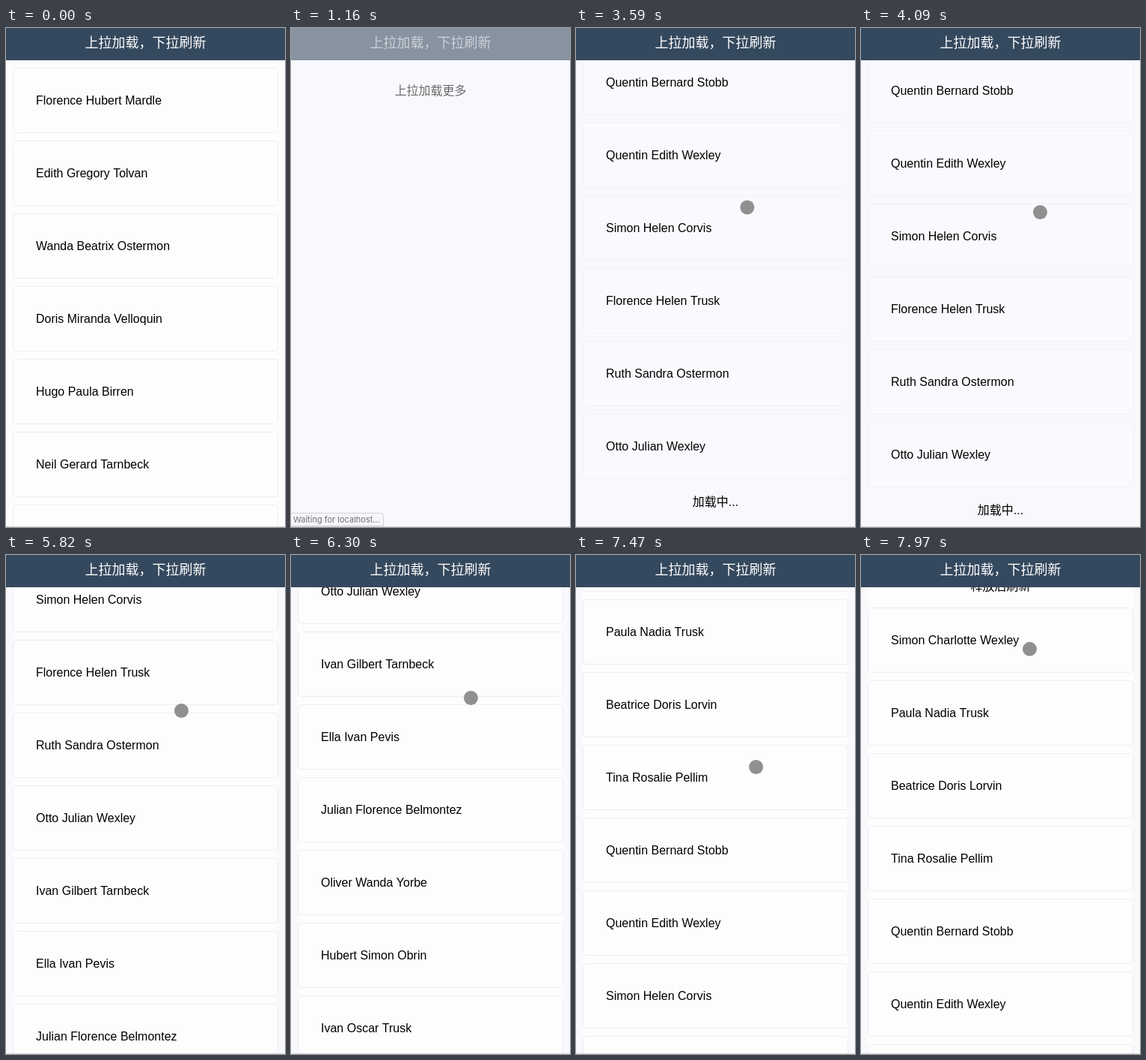
An HTML page with a canvas for the animation above (8 s loop, 373x665 px).

```html
<!DOCTYPE html>
<html lang="zh-CN">
<head>
<meta charset="utf-8">
<title>上拉加载，下拉刷新</title>
<style>
html, body { margin: 0; width: 100%; height: 100%; overflow: hidden; background: #fdfdfd; }
canvas { display: block; width: 373px; height: 665px; }
</style>
</head>
<body>
<canvas id="stage" width="373" height="665"></canvas>
<script>
const ctx = document.getElementById('stage').getContext('2d');
const W = 373, H = 665, LOOP = 8000;
const PITCH = 97, TOP = 53;
const CJK = '"Noto Sans CJK SC", "Noto Sans CJK", sans-serif';
const SANS = '16px "Liberation Sans", ' + CJK;

const CLEAR = 870, FADE = 510, READY = 1690, LOADED = 5110;

const oldRows = [
  'Florence Hubert Mardle', 'Edith Gregory Tolvan', 'Wanda Beatrix Ostermon',
  'Doris Miranda Velloquin', 'Hugo Paula Birren', 'Neil Gerard Tarnbeck',
  'Gustav Helen Mardle'
];
const newRows = [
  'Simon Charlotte Wexley', 'Paula Nadia Trusk', 'Beatrice Doris Lorvin',
  'Tina Rosalie Pellim', 'Quentin Bernard Stobb', 'Quentin Edith Wexley',
  'Simon Helen Corvis', 'Florence Helen Trusk', 'Ruth Sandra Ostermon',
  'Otto Julian Wexley', 'Ivan Gilbert Tarnbeck', 'Ella Ivan Pevis',
  'Julian Florence Belmontez', 'Oliver Wanda Yorbe', 'Hubert Simon Obrin',
  'Ivan Oscar Trusk', 'Neil Clara Trusk', 'Edith Neil Lorvin',
  'Duncan Rosalie Pevis', 'Gustav Helen Mardle'
];

// [time, scroll offset]
const scrollKeys = [
  [3180, 0], [3300, 100], [3420, 290], [3580, 412], [3680, 412], [3960, 401],
  [5300, 401], [5450, 480], [5820, 619], [6060, 690], [6300, 920], [6620, 1130],
  [6880, 1234], [6980, 1240], [7140, 1060], [7340, 420], [7540, 0],
  [7720, -52], [7970, -17], [8000, -14]
];
// [time, x, y]
const touchKeys = [
  [2160, 157, 17], [2340, 172, 100], [2520, 186, 180], [2760, 188, 186],
  [3060, 219, 314], [3180, 224, 380], [3420, 224, 255], [3700, 232, 235],
  [4090, 239, 245], [5110, 239, 245], [5290, 243, 330], [5500, 238, 235],
  [5820, 234, 207], [6060, 243, 320], [6300, 240, 190], [6600, 244, 300],
  [6880, 240, 183], [6980, 241, 170], [7200, 250, 330], [7420, 243, 300],
  [7580, 234, 230], [7970, 225, 125], [8000, 225, 122]
];

const clamp = (v, a, b) => Math.min(b, Math.max(a, v));

// Monotone cubic interpolation of column c
function track(keys, t, c = 1) {
  const last = keys.length - 1;
  if (t <= keys[0][0]) return keys[0][c];
  if (t >= keys[last][0]) return keys[last][c];
  let i = 0;
  while (t >= keys[i + 1][0]) i++;
  const slope = k => k < 0 || k >= last ? 0 :
    (keys[k + 1][c] - keys[k][c]) / (keys[k + 1][0] - keys[k][0]);
  const tangent = k => {
    const a = slope(k - 1), b = slope(k);
    return a * b <= 0 ? 0 : 2 * a * b / (a + b);
  };
  const h = keys[i + 1][0] - keys[i][0], u = (t - keys[i][0]) / h, v = 1 - u;
  return keys[i][c] * (1 + 2 * u) * v * v + keys[i + 1][c] * u * u * (3 - 2 * u) +
    h * u * v * (tangent(i) * v - tangent(i + 1) * u);
}

function rect(color, x, y, w, h) {
  ctx.fillStyle = color;
  ctx.fillRect(x, y, w, h);
}

function text(str, x, y, font, color, align = 'left') {
  ctx.font = font;
  ctx.fillStyle = color;
  ctx.textAlign = align;
  ctx.fillText(str, x, y);
}

const note = (str, mid) => text(str, W / 2, mid + 6, SANS, '#000', 'center');

function drawRows(rows, scroll, fill, border) {
  rows.forEach((name, i) => {
    const y = TOP + i * PITCH - scroll;
    if (y > H || y < -PITCH) return;
    ctx.beginPath();
    ctx.roundRect(9.5, y + .5, 354, 86, 4);
    ctx.fillStyle = fill;
    ctx.fill();
    ctx.strokeStyle = border;
    ctx.lineWidth = 1;
    ctx.stroke();
    text(name, 40, y + 49, SANS, '#000');
  });
}

function drawHeader() {
  rect('#35495e', 0, 0, W, 43);
  text('上拉加载，下拉刷新', W / 2, 26, '500 18px ' + CJK, '#fff', 'center');
}

function drawStatus(alpha) {
  if (alpha <= 0) return;
  ctx.globalAlpha = alpha;
  ctx.beginPath();
  ctx.roundRect(-2.5, 646.5, 126, 17, [0, 4, 0, 0]);
  ctx.fillStyle = '#f6f6f9';
  ctx.fill();
  ctx.strokeStyle = '#d2d2da';
  ctx.stroke();
  text('Waiting for localhost...', 3, 659, '11px Inter, sans-serif', '#70707a');
  ctx.globalAlpha = 1;
}

function drawList(t) {
  const full = t >= LOADED;
  const rows = full ? newRows : newRows.slice(0, 10);
  const scroll = Math.round(track(scrollKeys, t));
  if (full) rect('#fdfdfe', 9, 43, 355, 621);
  if (scroll < 0) note(t < 7690 ? '下拉刷新' : '释放后刷新', 24 - scroll);
  drawRows(rows, scroll, full ? '#fdfdfe' : '#faf9fd', full ? '#ededf0' : '#f2f1f5');
  const loading = !full && t > 3560;
  note(loading ? '加载中...' : '上拉加载更多', TOP + rows.length * PITCH + 20 - scroll);
}

function draw(t) {
  rect(t < CLEAR ? '#fdfdfd' : '#f9f9fd', 0, 0, W, H);
  if (t < CLEAR) {
    drawRows(oldRows, 0, '#fdfdfd', '#eeeeee');
    drawHeader();
  } else {
    ctx.globalAlpha = clamp((t - CLEAR) / FADE, 0, 1);
    if (t < READY) note('上拉加载更多', 83);
    else drawList(t);
    drawHeader();
    ctx.globalAlpha = 1;
  }
  if (t >= 180 && t < 1520) drawStatus(t < 270 ? .5 : clamp((1520 - t) / 140, 0, 1));
  if (t >= 2160) {
    ctx.beginPath();
    ctx.arc(track(touchKeys, t, 1) + .5, track(touchKeys, t, 2) + .5, 9.5, 0, 7);
    ctx.fillStyle = '#909090';
    ctx.fill();
  }
  rect('#dadada', 0, 664, W, 1);
}

const start = performance.now();
function tick() {
  draw((performance.now() - start) % LOOP);
  requestAnimationFrame(tick);
}
tick();
</script>
</body>
</html>
```
